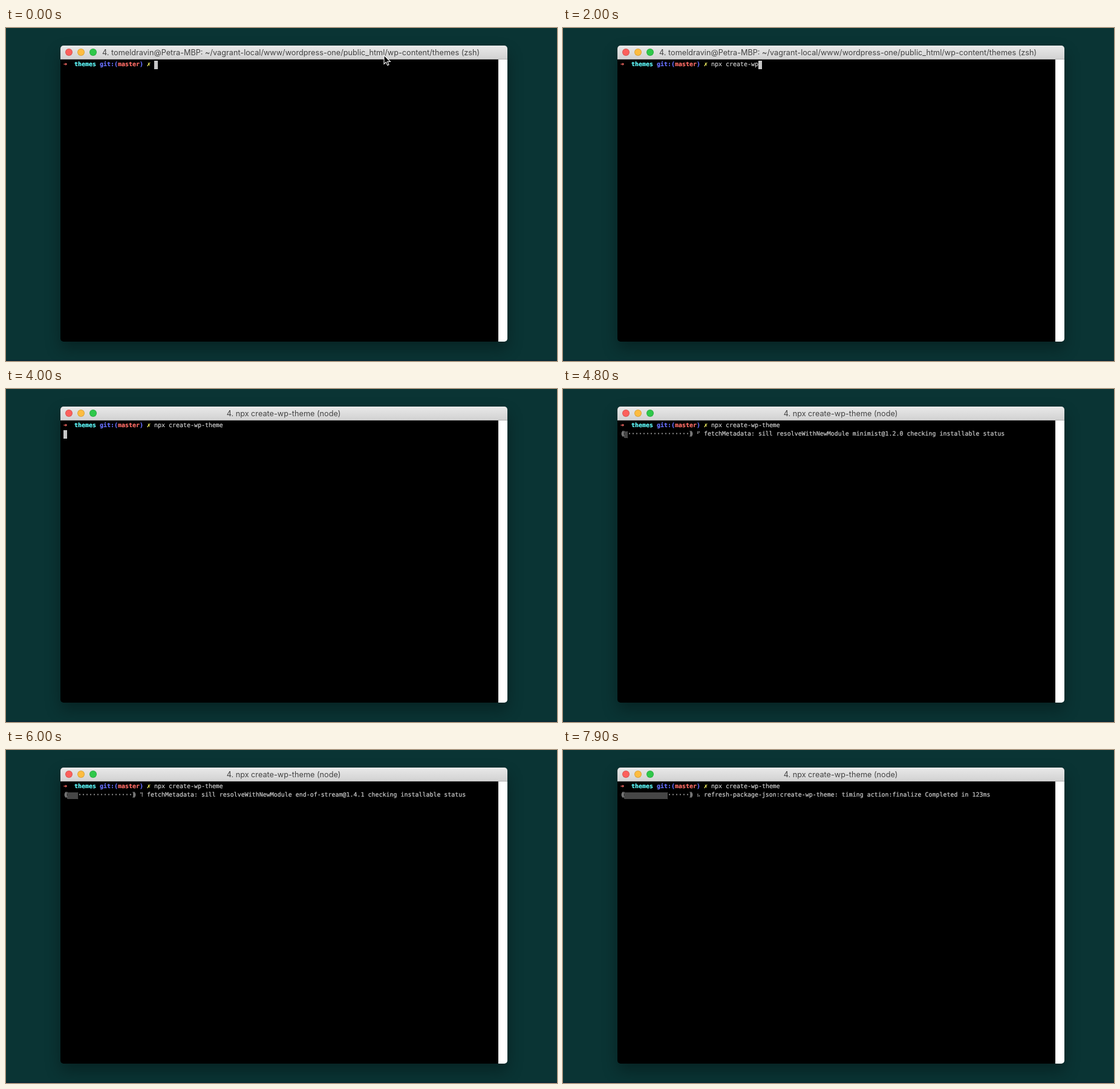
An HTML page for the animation above (8000 ms loop, 911x550 px).

```html
<!DOCTYPE html>
<html lang="en">
<head>
<meta charset="utf-8">
<title>Terminal</title>
<style>
  html, body { margin: 0; width: 100%; height: 100%; overflow: hidden; background: #0a3434; }
  #stage { position: relative; width: 911px; height: 550px; overflow: hidden; background: #0a3434; }
  #stage * { position: absolute; left: 0; top: 0; }
  #stage span, #stage b { white-space: pre; }
  #stage #floor { top: 548px; width: 911px; height: 2px; background: #0a2a36; }
  #stage #shadow, #stage #window { left: 90px; top: 29px; width: 739px; height: 489px; border-radius: 5px; }
  #stage #shadow { box-shadow: 0 12px 26px rgba(0, 0, 0, .32); }
  #stage #window { overflow: hidden; background: #000; }
  #stage #head {
    width: 739px; height: 22px; border-bottom: 1px solid #b4b4b4;
    background: linear-gradient(#e9e9e9, #d2d2d2);
  }
  #stage #title { font: 12.7px/23px Inter, sans-serif; color: #444; }
  #stage #head i {
    top: 5px; box-sizing: border-box; width: 12px; height: 12px;
    border: 1px solid #0002; border-radius: 50%;
  }
  #stage #scroll { left: 724px; top: 23px; width: 15px; height: 466px; background: #fff; }
  #stage #term {
    left: 95px; top: 54px; color: #cfcfcf; text-rendering: geometricPrecision;
    font: 9.966px/14px "DejaVu Sans Mono", monospace; -webkit-text-stroke: .2px;
  }
  #stage #cmd { left: 150px; }
  #stage #caret { width: 6px; height: 14px; background: #c7c7c7; }
  #stage #progress { top: 14px; }
  #stage #done {
    left: 6px; top: 2px; height: 11px;
    background: repeating-conic-gradient(#8c8c8c 0 25%, #000 0 50%) 0 0 / 2px 2px;
  }
  #stage #spin { left: 126px; font-family: "DejaVu Sans", sans-serif; font-size: 8.5px; }
  #stage #log { left: 138px; }
  #stage #mouse { top: 44px; width: 14px; height: 20px; }
</style>
</head>
<body>
<div id="stage">
  <div id="floor"></div>
  <div id="shadow"></div>
  <div id="window">
    <div id="head">
      <i style="left:8px;background:#fc605c"></i>
      <i style="left:28px;background:#fdbc40"></i>
      <i style="left:48px;background:#2fc84a"></i>
      <span id="title"></span>
    </div>
    <div id="scroll"></div>
  </div>
  <div id="term">
    <div id="prompt"></div>
    <span id="cmd"></span>
    <div id="caret"></div>
    <div id="progress">
      <span>(</span><span style="left:2px">(</span>
      <div id="done"></div>
      <span id="dots"></span>
      <span style="left:113px">)</span><span style="left:115px">)</span>
      <span id="spin"></span>
      <span id="log"></span>
    </div>
  </div>
  <svg id="mouse" viewBox="0 0 14 20">
    <path d="M1 1V15.5L4.4 12.4L6.7 17.6L9 16.6L6.8 11.5H11.4Z" fill="#000" stroke="#fff" stroke-width="1.1"/>
  </svg>
</div>
<script>
const $ = id => document.getElementById(id);
const LOOP = 8000, CELL = 6, ROW = 14, BAR = 18;
const COMMAND = 'npx create-wp-theme';
const SHELL_TITLE = '4. tomeldravin@Petra-MBP: ~/vagrant-local/www/wordpress-one/public_html/wp-content/themes (zsh)';
const NODE_TITLE = `4. ${COMMAND} (node)`;
const SPINNER = [...'⠋⠙⠹⠸⠼⠴⠦⠧⠇⠏'];

// column, text, colour
const PROMPT = [
  [0, '➜', '#ff6e67'], [3, 'themes', '#60fdff'], [10, 'git:(', '#6871ff'],
  [15, 'master', '#ff6e67'], [21, ')', '#6871ff'], [23, '✗', '#fffc67']
];
for (const [col, text, color] of PROMPT) {
  const part = document.createElement('b');
  part.textContent = text;
  part.style.cssText = `left:${col * CELL}px;color:${color}`;
  $('prompt').append(part);
}

// Typing pauses after "npx create-wp".
function typedCount(t) {
  if (t < 1100) return 0;
  if (t < 2700) return Math.min(13, Math.round(1.3 * (Math.floor(t / 100) - 10)));
  if (t < 3300) return Math.min(18, Math.round(14 + 1.34 * (Math.floor(t / 100) - 27)));
  return COMMAND.length;
}

// One package per 100 ms, starting at 4600.
const PACKAGES = ('commander@2.19.0 fs-extra@7.0.1 minimist@1.2.0 chalk@2.4.1 inquirer@6.2.0 ' +
  'mkdirp@0.5.1 rimraf@2.6.2 glob@7.1.3 graceful-fs@4.1.15 jsonfile@4.0.0 universalify@0.1.2 ' +
  'tar-stream@1.6.2 pump@3.0.0 once@1.4.0 end-of-stream@1.4.1 readable-stream@2.3.6').split(' ');

// start time, filled cells, spinner step, message
const STEPS = PACKAGES.map((name, i) => [
  4600 + i * 100, i < 7 ? 1 : i < 12 ? 2 : 3, i + 8,
  `fetchMetadata: sill resolveWithNewModule ${name} checking installable status`
]).concat([
  [6900, 6, 0, 'extract:create-wp-theme: sill extract create-wp-theme@1.0.0'],
  [7000, 7, 1, 'extract:create-wp-theme: verb lock using /Users/tomeldravin/.npm/_locks/staging-3f192efacb1c88d'],
  [7500, 8, 2, 'extract:readable-stream: sill extract readable-stream@2.3.6'],
  [7600, 9, 3, 'extract:tar-stream: sill extract tar-stream@1.6.2'],
  [7700, 10, 4, 'finalize:create-wp-theme: sill finalize create-wp-theme@1.0.0'],
  [7800, 11, 5, 'refresh-package-json:create-wp-theme: sill refresh-package-json'],
  [7900, 12, 6, 'refresh-package-json:create-wp-theme: timing action:finalize Completed in 123ms']
]);

function show(id, on) { $(id).style.visibility = on ? 'visible' : 'hidden'; }

function draw(t) {
  const count = typedCount(t), entered = t >= 3800, running = t >= 3900;
  $('cmd').textContent = COMMAND.slice(0, count);

  const title = $('title');
  title.textContent = running ? NODE_TITLE : SHELL_TITLE;
  title.style.left = running ? '369px' : '69px';
  title.style.transform = running ? 'translateX(-50%)' : 'none';

  $('caret').style.left = (entered ? 0 : (25 + count) * CELL) + 'px';
  $('caret').style.top = (entered ? ROW : 0) + 'px';

  $('mouse').style.left = (t < 500 ? 624 : 625) + 'px';
  show('mouse', t < 1100);

  const step = STEPS.filter(s => s[0] <= t).pop();
  show('caret', !step);
  show('progress', step);
  if (!step) return;
  const [, filled, spin, message] = step;
  $('done').style.width = filled * CELL + 'px';
  $('dots').style.left = (1 + filled) * CELL + 'px';
  $('dots').textContent = '·'.repeat(BAR - filled);
  $('spin').textContent = SPINNER[spin % SPINNER.length];
  $('log').textContent = message;
}

const start = performance.now();
function tick() {
  draw((performance.now() - start) % LOOP);
  requestAnimationFrame(tick);
}
tick();
</script>
</body>
</html>
```
